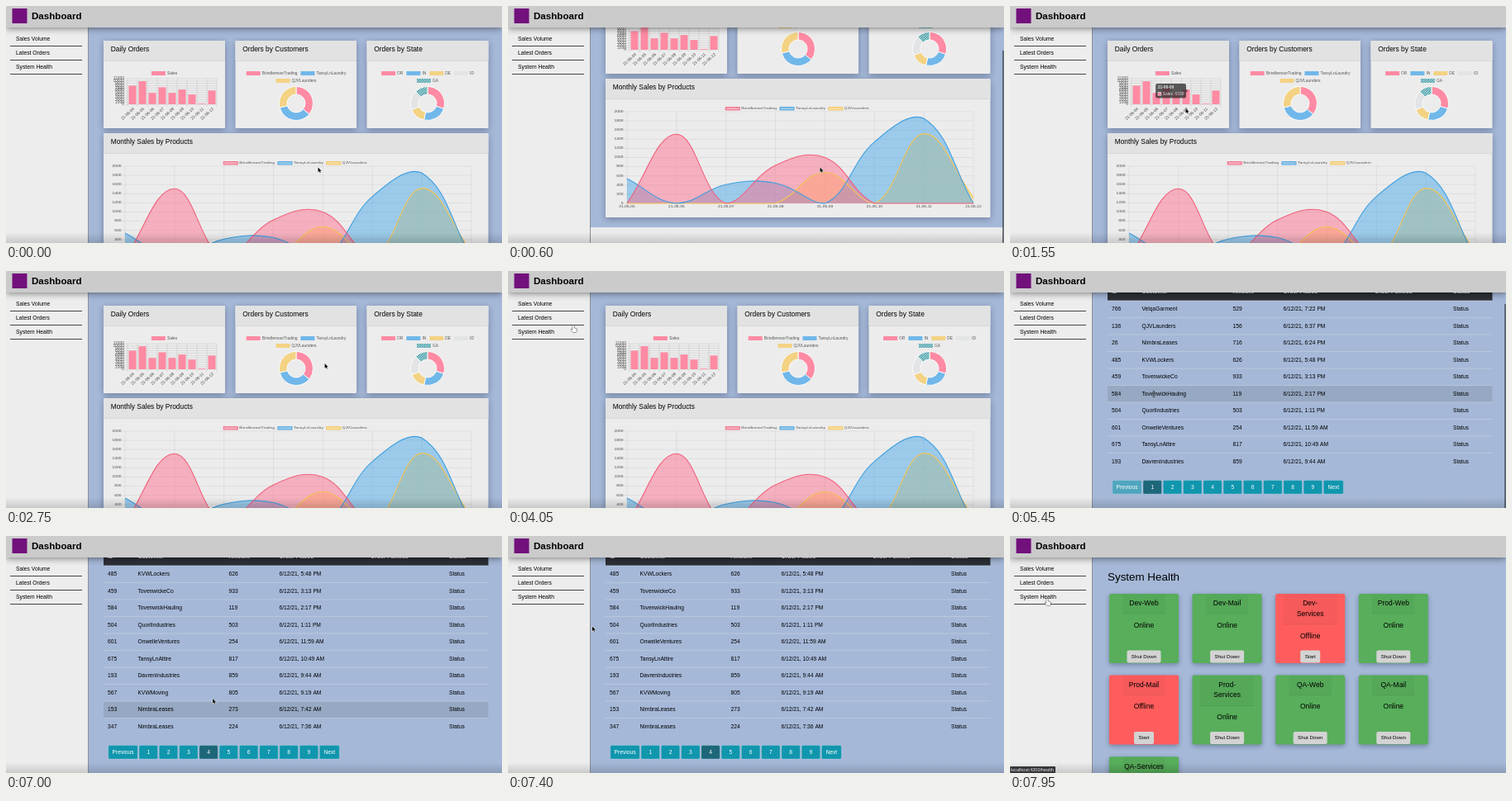
Animation, 600 px wide and 287 px high, one loop 8000 ms. Source, as an HTML page with a canvas:

```html
<!DOCTYPE html>
<html lang="en">
<head>
<meta charset="utf-8">
<title>Dashboard</title>
<style>
html, body { margin: 0; width: 100%; height: 100%; overflow: hidden; background: #a5b8d8; }
canvas { display: block; width: 100vw; height: 100vh; }
</style>
</head>
<body>
<canvas id="stage"></canvas>
<script>
const W = 600, H = 287, LOOP = 8000;
const canvas = document.getElementById('stage');
const dpr = window.devicePixelRatio || 1;
canvas.width = W * dpr;
canvas.height = H * dpr;
const ctx = canvas.getContext('2d');

const PINK = '#ff8aa3', BLUE = '#70b7ea', YELLOW = '#f3d283', GREY = '#e2e4e6';
const COMPANIES = ['BrindlemoorTrading', 'TansyLnLaundry', 'QJVLaunders'];

// ---------- timing ----------
const clamp = (v, a = 0, b = 1) => Math.min(b, Math.max(a, v));
const ease = p => p * p * (3 - 2 * p);
const ramp = (t, from, to) => ease(clamp((t - from) / (to - from)));
const pageAt = t => t < 4450 ? 'sales' : t < 7700 ? 'orders' : 'health';
const listPageAt = t => 1 + [5950, 6250, 6550].filter(c => t >= c).length;
const scrollAt = t => t < 4450
  ? 66 * (ramp(t, 120, 560) - ramp(t, 920, 1250))
  : t < 7700 ? 46 * ramp(t, 4700, 5080) : 0;

// time, x, y of the pointer
const POINTER = [
  [0, 377.5, 195.5], [1130, 377.5, 195.5], [1500, 212.5, 124], [1700, 212.5, 124],
  [2100, 362, 110], [2400, 356, 132], [2650, 336, 112], [2950, 524, 112],
  [3200, 515, 133], [3400, 500, 105], [3550, 500, 105], [4030, 79, 66],
  [4120, 79, 66], [4350, 50, 57], [4650, 50, 57], [5150, 174, 149],
  [5550, 174, 149], [5880, 197, 262], [6020, 197, 262], [6170, 221, 262],
  [6320, 221, 262], [6470, 245, 262], [6650, 245, 262], [6920, 250, 197],
  [7120, 250, 197], [7550, 45, 76], [LOOP, 45, 76]
];
function pointerAt(t) {
  const i = POINTER.findIndex(k => k[0] > t);
  const [a, b] = [POINTER[i - 1], POINTER[i]];
  const p = ramp(t, a[0], b[0]);
  return { x: a[1] + (b[1] - a[1]) * p, y: a[2] + (b[2] - a[2]) * p };
}

// ---------- drawing helpers ----------
function text(str, x, y, size, { color = '#000', align = 'left', weight = '', flat = 1 } = {}) {
  ctx.save();
  ctx.translate(x, y);
  ctx.scale(1, flat);
  ctx.font = `${weight} ${size}px "Liberation Sans", Arial, sans-serif`;
  ctx.fillStyle = color;
  ctx.textAlign = align;
  ctx.textBaseline = 'middle';
  ctx.fillText(str, 0, 0);
  ctx.restore();
}
function rect(x, y, w, h, fill, radius = 0) {
  ctx.fillStyle = fill;
  ctx.beginPath();
  ctx.roundRect(x, y, w, h, radius);
  ctx.fill();
}
function line(x1, y1, x2, y2, color, width = 0.6) {
  ctx.strokeStyle = color;
  ctx.lineWidth = width;
  ctx.beginPath();
  ctx.moveTo(x1, y1);
  ctx.lineTo(x2, y2);
  ctx.stroke();
}
function shadowed(color, blur, dy, paint) {
  ctx.save();
  ctx.shadowColor = color;
  ctx.shadowBlur = blur * dpr;
  ctx.shadowOffsetY = dy * dpr;
  paint();
  ctx.restore();
}
function hatch(base, mark) {
  const tile = document.createElement('canvas');
  tile.width = tile.height = 3;
  const c = tile.getContext('2d');
  c.fillStyle = base;
  c.fillRect(0, 0, 3, 3);
  c.fillStyle = mark;
  for (let i = 0; i < 3; i++) c.fillRect(i, 2 - i, 1, 1);
  return ctx.createPattern(tile, 'repeat');
}
const TEAL = hatch('#5cb0b8', '#b4cdd2');

function card(x, y, w, h, title) {
  shadowed('rgba(20,30,60,.36)', 8, 2, () => rect(x, y, w, h, '#ececec', 1));
  rect(x, y, w, 24.5, '#e2e2e2', 1);
  line(x, y + 24.5, x + w, y + 24.5, '#cfcfcf');
  text(title, x + 8.7, y + 10.5, 8.4);
}
function legend(items, cx, y, flat = 1) {
  const size = 4.9, outlined = flat < 1;
  ctx.font = `${size}px "Liberation Sans", Arial, sans-serif`;
  const widths = items.map(item => ctx.measureText(item.label).width);
  let x = cx - (widths.reduce((a, b) => a + b, 0) + items.length * 23 - 4) / 2;
  items.forEach((item, i) => {
    const h = 5 * flat;
    rect(x, y - h / 2, 17, h, item.fill);
    if (outlined) {
      ctx.strokeStyle = item.stroke;
      ctx.lineWidth = 0.9;
      ctx.strokeRect(x, y - h / 2, 17, h);
    }
    text(item.label, x + 19, y, size, { color: '#555', flat });
    x += widths[i] + 23;
  });
}
function tooltip(right, cy, title, body, swatch) {
  ctx.font = '4.9px "Liberation Sans", Arial, sans-serif';
  const w = ctx.measureText(body).width + 11, h = title ? 17.5 : 10;
  const x = right - w, y = cy - h / 2;
  rect(x, y, w, h, 'rgba(40,40,40,.75)', 2);
  ctx.beginPath();
  ctx.moveTo(right, cy - 2);
  ctx.lineTo(right + 2, cy);
  ctx.lineTo(right, cy + 2);
  ctx.fill();
  if (title) text(title, x + 2.5, y + 5, 4.9, { color: '#ddd', weight: 'bold' });
  const by = y + h - 5;
  rect(x + 2.5, by - 2.2, 4.4, 4.4, '#ddd');
  rect(x + 3, by - 1.7, 3.4, 3.4, swatch);
  text(body, x + 8.5, by, 4.9, { color: '#ddd' });
}

// ---------- sales page ----------
const SALES = [8000, 9900, 4900, 7300, 4900, 6339, 4200, 300, 5900];
const dayLabel = d => '21-06-' + String(d).padStart(2, '0');

function barChart(mouse) {
  const left = 147, base = 119, top = 88, step = 12;
  const yOf = v => base - (base - top) * v / 11000;
  legend([{ label: 'Sales', fill: PINK }], 191.5, 81.5);
  for (let v = 0; v <= 11000; v += 1000) {
    line(left - 3, yOf(v), left + 108, yOf(v), 'rgba(0,0,0,.16)', 0.5);
    text(v, left - 4, yOf(v), 4.9, { color: '#555', align: 'right' });
  }
  for (let i = 0; i <= 9; i++) line(left + i * step, top, left + i * step, base + 3, 'rgba(0,0,0,.14)', 0.5);
  SALES.forEach((v, i) => {
    const cx = left + (i + 0.5) * step;
    rect(cx - 4.5, yOf(v), 9, base - yOf(v), PINK);
    ctx.save();
    ctx.translate(cx + 1.5, base + 5);
    ctx.rotate(-0.75);
    text(dayLabel(i + 4), 0, 0, 4.9, { color: '#444', align: 'right' });
    ctx.restore();
  });
  const i = Math.floor((mouse.x - left) / step);
  if (i in SALES && mouse.y > 85 && mouse.y < 127)
    tooltip(left + (i + 0.5) * step, yOf(SALES[i]) + 1.5, dayLabel(i + 4), 'Sales: ' + SALES[i], PINK);
}

function donut(cx, cy, slices, mouse) {
  const outer = 20.5, inner = 11;
  const dx = mouse.x - cx, dy = mouse.y - cy, dist = Math.hypot(dx, dy);
  const turn = (Math.atan2(dx, -dy) / (2 * Math.PI) + 1) % 1;
  let start = 0, hit = null;
  for (const s of slices) {
    const a = start * 2 * Math.PI - Math.PI / 2, b = s.end * 2 * Math.PI - Math.PI / 2;
    ctx.beginPath();
    ctx.arc(cx, cy, outer, a, b);
    ctx.arc(cx, cy, inner, b, a, true);
    ctx.closePath();
    ctx.fillStyle = s.fill;
    ctx.fill();
    ctx.strokeStyle = '#fafafa';
    ctx.lineWidth = 1;
    ctx.stroke();
    if (dist > inner && dist < outer && turn >= start && turn < s.end)
      hit = { ...s, mid: (a + b) / 2, share: Math.round((s.end - start) * 30000) };
    start = s.end;
  }
  if (hit)
    tooltip(cx + 15.5 * Math.cos(hit.mid) - 2, cy + 15.5 * Math.sin(hit.mid), '', `${hit.label}: ${hit.share}`, hit.fill);
}
const CUSTOMERS = [
  { label: COMPANIES[0], fill: PINK, end: 0.36 },
  { label: COMPANIES[1], fill: BLUE, end: 0.71 },
  { label: COMPANIES[2], fill: YELLOW, end: 1 }
];
const STATES = [
  { label: 'OR', fill: PINK, end: 0.3 },
  { label: 'IN', fill: BLUE, end: 0.535 },
  { label: 'DE', fill: YELLOW, end: 0.69 },
  { label: 'ID', fill: GREY, end: 0.875 },
  { label: 'GA', fill: TEAL, end: 1 }
];

const SERIES = [
  { rgb: '252,108,138', stroke: '#f0607c', values: [0, 1510, 0, 830, 1000, 0, 0, 0] },
  { rgb: '66,163,230', stroke: '#3f9fe0', values: [540, 0, 410, 440, 0, 1340, 1850, 0] },
  { rgb: '255,205,86', stroke: '#f6c453', values: [0, 0, 0, 0, 680, 0, 1520, 130] }
].map((s, i) => ({ ...s, label: COMPANIES[i], fill: `rgba(${s.rgb},.48)` }));

// The whole area chart is squashed vertically, lettering included
const FLAT = 0.66;
const PLOT = { left: 144, right: 563, top: 194, base: 305 };
const plotX = i => PLOT.left + (PLOT.right - PLOT.left) * i / 7;
const plotY = v => PLOT.base - (PLOT.base - PLOT.top) * v / 2000;

// Smooth curve whose control points stay inside the plot
function spline(values) {
  const pts = values.map((v, i) => ({ x: plotX(i), y: plotY(v) }));
  const controls = pts.map((p, i) => {
    const a = pts[i - 1] || p, b = pts[i + 1] || p;
    const before = Math.hypot(p.x - a.x, p.y - a.y), after = Math.hypot(b.x - p.x, b.y - p.y);
    const at = k => ({
      x: clamp(p.x + k * (b.x - a.x), PLOT.left, PLOT.right),
      y: clamp(p.y + k * (b.y - a.y), PLOT.top, PLOT.base)
    });
    const f = 0.4 / (before + after);
    return { into: at(-f * before), out: at(f * after) };
  });
  const path = new Path2D();
  path.moveTo(pts[0].x, pts[0].y);
  for (let i = 1; i < pts.length; i++) {
    const c1 = controls[i - 1].out, c2 = controls[i].into;
    path.bezierCurveTo(c1.x, c1.y, c2.x, c2.y, pts[i].x, pts[i].y);
  }
  return path;
}
function areaChart() {
  const tick = { color: '#444', flat: FLAT };
  legend(SERIES, 350, 190.3, FLAT);
  for (let v = 0; v <= 2000; v += 200) {
    line(PLOT.left - 4, plotY(v), PLOT.right, plotY(v), 'rgba(0,0,0,.1)');
    text(v, PLOT.left - 4.5, plotY(v), 4.9, { ...tick, align: 'right' });
  }
  for (let i = 0; i < 8; i++) {
    line(plotX(i), PLOT.top, plotX(i), PLOT.base + 3, 'rgba(0,0,0,.1)');
    text(dayLabel(i + 5), plotX(i), PLOT.base + 4.3, 4.9, { ...tick, align: 'center' });
  }
  const layers = SERIES.map(s => ({ ...s, curve: spline(s.values) })).reverse();
  for (const { curve, fill } of layers) {
    const area = new Path2D(curve);
    area.lineTo(PLOT.right, PLOT.base);
    area.lineTo(PLOT.left, PLOT.base);
    ctx.fillStyle = fill;
    ctx.fill(area);
  }
  ctx.lineWidth = 1.1;
  for (const { curve, stroke } of layers) {
    ctx.strokeStyle = stroke;
    ctx.stroke(curve);
  }
}
function salesPage(mouse) {
  rect(99, 334, 501, 80, '#ebebeb');
  card(118, 42, 147, 106, 'Daily Orders');
  card(277.5, 42, 146.5, 106, 'Orders by Customers');
  card(436.5, 42, 147, 106, 'Orders by State');
  card(118, 154, 465.5, 168, 'Monthly Sales by Products');
  areaChart();
  legend(CUSTOMERS.slice(0, 2), 351, 81.5);
  legend(CUSTOMERS.slice(2), 351, 90.5);
  legend(STATES.slice(0, 4), 510, 81.5);
  legend(STATES.slice(4), 510, 90.5);
  donut(351, 118, CUSTOMERS, mouse);
  donut(510, 118, STATES, mouse);
  barChart(mouse);
}

// ---------- orders page ----------
const ORDERS = `766 VelqaGarment 529 7:22 PM
136 QJVLaunders 156 6:37 PM
26 NimbraLeases 716 6:24 PM
485 KVWLockers 626 5:48 PM
459 TovenwickeCo 933 3:13 PM
584 TovenwickHauling 119 2:17 PM
504 QuorlIndustries 503 1:11 PM
601 OnwelleVentures 254 11:59 AM
675 TansyLnAttire 817 10:49 AM
193 DavrenIndustries 859 9:44 AM
567 KVWMoving 805 9:19 AM
153 NimbraLeases 273 7:42 AM
347 NimbraLeases 224 7:36 AM`.split('\n').map(row => {
  const [id, name, amount, ...time] = row.split(' ');
  return [id, name, amount, '6/12/21, ' + time.join(' '), '', 'Status'];
});
const COLUMNS = [123, 159.5, 269.5, 330.5, 441, 536];
const HEADINGS = ['ID', 'Customer', 'Amount', 'Order Placed', 'Order Fulfilled', 'Status'];
const ROW = 20.5, FIRST_ROW = 82;

function pagerButton(label, x, w, fill) {
  rect(x, 299.5, w, 16.5, fill, 1.5);
  ctx.strokeStyle = 'rgba(190,225,235,.5)';
  ctx.lineWidth = 0.6;
  ctx.stroke();
  text(label, x + w / 2, 308, 6.7, { color: '#fff', align: 'center' });
}
function ordersPage(mouse, page) {
  text('Latest Orders', 118, 50, 13.4);
  rect(118, FIRST_ROW - ROW, 465.5, ROW, '#2c3036');
  HEADINGS.forEach((h, i) => text(h, COLUMNS[i], FIRST_ROW - 10.5, 6.7, { color: '#fff', weight: 'bold' }));
  const hovered = Math.floor((mouse.y + 4 - FIRST_ROW) / ROW);
  ORDERS.slice(page - 1, page + 9).forEach((order, r) => {
    const y = FIRST_ROW + r * ROW;
    if (r === hovered && mouse.x > 118) rect(118, y, 465.5, ROW, '#96a8c2');
    line(118, y, 583.5, y, '#c3cede', 0.7);
    order.forEach((cell, i) => text(cell, COLUMNS[i], y + 10.6, 6.7));
  });
  pagerButton('Previous', 123.8, 35.5, page === 1 ? '#50a5be' : '#1096ad');
  for (let n = 1; n <= 9; n++)
    pagerButton(n, 161 + (n - 1) * 24.27, 22.5, n === page ? '#1d6779' : '#1096ad');
  pagerButton('Next', 379.3, 24, '#1096ad');
}

// ---------- health page ----------
const SERVERS = ['Dev-Web', 'Dev-Mail', 'Dev- Services', 'Prod-Web', 'Prod-Mail',
  'Prod- Services', 'QA-Web', 'QA-Mail', 'QA-Services'];
const OFFLINE = ['Dev- Services', 'Prod-Mail'];

function healthPage() {
  text('System Health', 118, 50, 13.4);
  SERVERS.forEach((name, i) => {
    const x = 120 + (i % 4) * 100.6, y = 70 + Math.floor(i / 4) * 98.6, cx = x + 42;
    const off = OFFLINE.includes(name), lines = name.split(' ');
    const extra = (lines.length - 1) * 13;
    shadowed('rgba(20,30,60,.36)', 6, 2, () => rect(x, y, 84, 84, off ? '#ff5d5d' : '#58ae5b', 2));
    const boxW = lines.length > 1 ? 65 : 51;
    rect(cx - boxW / 2, y, boxW, 24 + extra, 'rgba(0,0,0,.035)');
    line(cx - boxW / 2, y + 24 + extra, cx + boxW / 2, y + 24 + extra, 'rgba(0,0,0,.13)');
    lines.forEach((l, k) => text(l, cx, y + 12 + k * 12.5, 8.5, { align: 'center' }));
    text(off ? 'Offline' : 'Online', cx, y + 38.5 + extra, 8.5, { align: 'center' });
    const w = off ? 24 : 41;
    rect(cx - w / 2, y + 68.5, w, 15, '#d3d3d3', 2);
    text(off ? 'Start' : 'Shut Down', cx, y + 76, 6.2, { align: 'center' });
  });
}

// ---------- frame of the page ----------
function sidebar() {
  rect(0, 0, 99, H, '#ededed');
  line(99.5, 26, 99.5, H, '#8d8f94', 1);
  ['Sales Volume', 'Latest Orders', 'System Health'].forEach((label, i) => {
    text(label, 12, 40.3 + i * 17, 6.75);
    line(5, 48.5 + i * 17, 92, 48.5 + i * 17, '#333', 0.9);
  });
}
function navbar() {
  shadowed('rgba(0,0,0,.5)', 8, 1, () => rect(0, 0, W, 26, '#cbcbcb'));
  rect(7.5, 3, 18, 18, '#72107c');
  text('Dashboard', 31, 13, 11.6, { weight: 'bold' });
}
function scrollbar(t, scroll, range) {
  const seen = t < 4450
    ? ramp(t, 110, 180) - ramp(t, 1350, 1500)
    : ramp(t, 4690, 4760) - ramp(t, 5600, 5800);
  if (seen <= 0) return;
  const k = H / (H + range);
  rect(598, scroll * k, 2, H * k, `rgba(70,75,85,${0.75 * seen})`, 1);
}
function statusBar(t) {
  const url = t >= 4200 && t < 4700 ? 'orders' : t >= 7600 ? 'health' : '';
  if (!url) return;
  rect(0, 279, 55, 8, '#34363a', 1);
  text('localhost:4200/' + url, 1, 283.2, 5.5, { color: '#e6e6e6' });
}

const ARROW = new Path2D('M0 0V5.8L1.4 4.6 2.3 6.6 3.2 6.2 2.3 4.2H4.2Z');
const HAND = new Path2D('M-.8 0Q0-1 .8 0V3L3.6 3.7Q4.4 4 4.2 5L3.6 8H-.6L-3 5Q-2.4 3.8-.8 5.2Z');
const BEAM = new Path2D('M-1.3-3.5H1.3M0-3.5V3.5M-1.3 3.5H1.3');
function pointer({ x, y }, page) {
  const onLink = x < 92 && y > 31 && y < 83;
  const onPager = page === 'orders' && y > 253 && y < 270 && x > 124 && x < 404;
  const onCell = page === 'orders' && x > 159 && x < 213 && y > 36 && y < 241;
  ctx.save();
  ctx.translate(x, y);
  ctx.lineJoin = 'round';
  if (onCell) {
    ctx.strokeStyle = '#333';
    ctx.lineWidth = 0.7;
    ctx.stroke(BEAM);
  } else {
    const hand = onLink || onPager, shape = hand ? HAND : ARROW;
    ctx.strokeStyle = hand ? '#111' : '#fff';
    ctx.fillStyle = hand ? '#fff' : '#000';
    ctx.lineWidth = hand ? 0.8 : 1;
    ctx.stroke(shape);
    ctx.fill(shape);
  }
  ctx.restore();
}

function draw(t) {
  const page = pageAt(t), scroll = scrollAt(t), mouse = pointerAt(t);
  const local = { x: mouse.x, y: mouse.y + scroll };
  ctx.setTransform(dpr, 0, 0, dpr, 0, 0);
  rect(0, 0, W, H, '#a5b8d8');
  ctx.save();
  ctx.translate(0, -scroll);
  if (page === 'sales') salesPage(local);
  else if (page === 'orders') ordersPage(local, listPageAt(t));
  else healthPage();
  ctx.restore();
  sidebar();
  navbar();
  scrollbar(t, scroll, page === 'sales' ? 66 : 46);
  const shade = ctx.createLinearGradient(0, 274, 0, H);
  shade.addColorStop(0, 'rgba(0,0,0,0)');
  shade.addColorStop(1, 'rgba(0,0,0,.15)');
  rect(0, 274, W, 13, shade);
  statusBar(t);
  pointer(mouse, page);
}

const start = performance.now();
function tick() {
  draw((performance.now() - start) % LOOP);
  requestAnimationFrame(tick);
}
tick();
</script>
</body>
</html>
```
